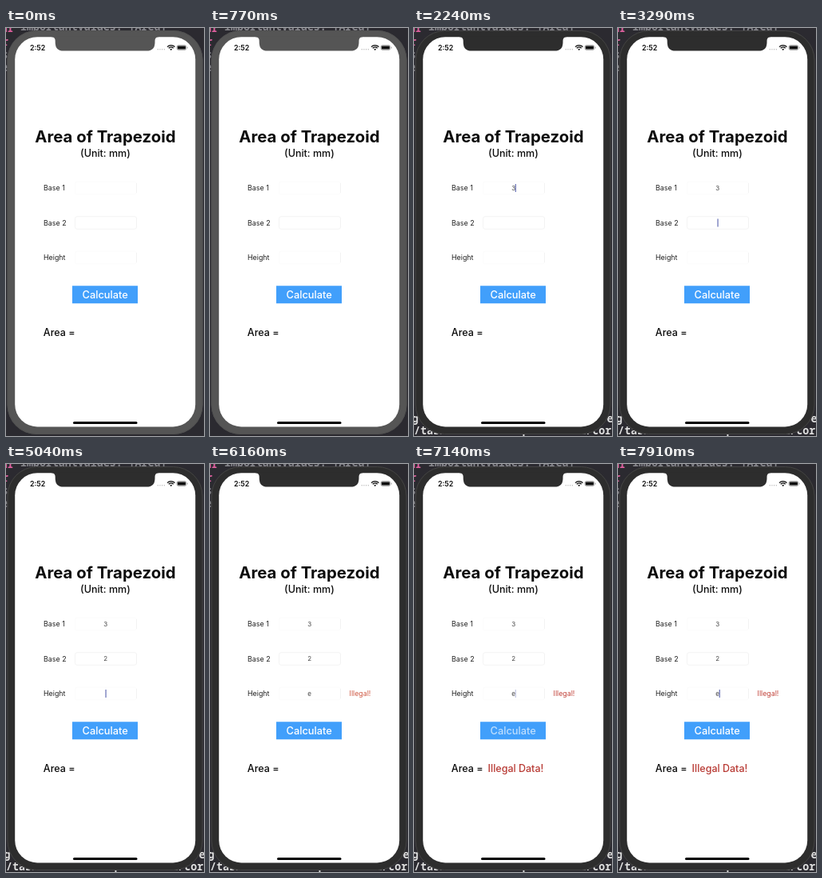
Recreate the animation shown at these times as an HTML page with a canvas. Size 248x510 px, loop 8000 ms.

```html
<!DOCTYPE html>
<html lang="en">
<head>
<meta charset="utf-8">
<title>Area of Trapezoid</title>
<style>
html, body { margin: 0; width: 100%; height: 100%; overflow: hidden; background: #2b2a30; }
canvas { display: block; width: 248px; height: 510px; }
</style>
</head>
<body>
<canvas id="stage"></canvas>
<script>
const W = 248, H = 510, LOOP = 8000, STEP = 70;
const SANS = 'Inter, "Liberation Sans", sans-serif';
const MONO = '"Noto Sans Mono", "DejaVu Sans Mono", monospace';
const INK = '#0c0c0c', CARET = '#5660ad';
const canvas = document.getElementById('stage');
const ctx = canvas.getContext('2d');
const dpr = window.devicePixelRatio || 1;
canvas.width = W * dpr;
canvas.height = H * dpr;

const clamp = v => Math.max(0, Math.min(1, v));
const ramp = (t, from, to) => clamp((t - from) / (to - from));

function text(str, x, y, size, { color = INK, weight = 400, align = 'left', family = SANS, alpha = 1 } = {}) {
  ctx.globalAlpha = alpha;
  ctx.font = `${weight} ${size}px ${family}`;
  ctx.textAlign = align;
  ctx.fillStyle = color;
  ctx.fillText(str, x, y);
  ctx.globalAlpha = 1;
}

function box(x, y, w, h, r, fill, stroke) {
  ctx.beginPath();
  ctx.roundRect(x, y, w, h, r);
  if (fill) { ctx.fillStyle = fill; ctx.fill(); }
  if (stroke) { ctx.strokeStyle = stroke; ctx.lineWidth = 1; ctx.stroke(); }
}

function drawDesktop(t) {
  ctx.fillStyle = '#2b2a30';
  ctx.fillRect(0, 0, W, H);
  const code = (str, x, y, color, alpha) => text(str, x, y, 13.3, { color, alpha, family: MONO, weight: 600 });
  code('ar', -6, 5, '#e0609f');
  code('importantValues: [Area]', 18, 3, '#85858b');
  code('r', -5, 22, '#e0609f');
  code('s', -5.5, 38, '#85858b');
  code('e', -5.5, 54, '#85858b');
  const shown = t < 1400 ? 0 : t < 1540 ? 0.5 : 1;
  if (!shown) return;
  code('g', -2.5, 492.5, '#dedede', shown);
  code('e', 241.5, 493, '#dedede', shown);
  code('/tasks/stacks/shapes/areas2/cor', 0, 508, '#dedede', shown);
}

function drawPhone(t) {
  const active = t >= 1260;
  const bezel = active ? '#2d2d2d' : '#555555';
  box(1.5, 3, 245, 505, 37, bezel);
  box(2, 3.5, 244, 504, 36.5, null, active ? '#444' : '#505050');
  box(11.2, 11.2, 226, 487.3, 28, '#fff');

  // Notch
  ctx.fillStyle = bezel;
  ctx.beginPath();
  ctx.moveTo(57, 10.5);
  ctx.lineTo(57, 11.2);
  ctx.quadraticCurveTo(61.7, 11.2, 61.7, 16);
  ctx.lineTo(61.7, 18);
  ctx.quadraticCurveTo(61.7, 28.6, 72, 28.6);
  ctx.lineTo(176, 28.6);
  ctx.quadraticCurveTo(186.5, 28.6, 186.5, 18);
  ctx.lineTo(186.5, 16);
  ctx.quadraticCurveTo(186.5, 11.2, 191, 11.2);
  ctx.lineTo(191, 10.5);
  ctx.fill();
  box(84, 491.9, 80.5, 3, 1.5, '#000');
}

function drawStatus() {
  text('2:52', 30, 27.5, 8.8, { weight: 600 });
  for (let i = 0; i < 4; i++) box(189.5 + i * 2.7, 26, 1.5, 1.5, 0.75, '#bbb');

  ctx.strokeStyle = INK;
  ctx.lineWidth = 1.4;
  for (const r of [6.4, 4]) {
    ctx.beginPath();
    ctx.arc(206.7, 28, r, -Math.PI * 0.76, -Math.PI * 0.24);
    ctx.stroke();
  }
  ctx.fillStyle = INK;
  ctx.beginPath();
  ctx.moveTo(206.7, 28);
  ctx.arc(206.7, 28, 2, -Math.PI * 0.76, -Math.PI * 0.24);
  ctx.fill();

  box(214.1, 21.7, 11.6, 5.6, 1.7, null, '#999');
  box(214.9, 22.5, 10, 4, 0.8, INK);
  box(226.6, 23.5, 1, 2, 0.5, '#999');
}

// Returns the caret's position and opacity.
function caretAt(t) {
  if (t < 1680) return null;
  if (t < 2240) return { y: 200, x: 124, a: 1 };
  if (t < 3150) return { y: 200, x: 126.7, a: 1 - ramp(t, 2730, 2870) };
  if (t < 3710) return { y: 243.5, x: 124.5, a: 1 };
  if (t < 5040) return { y: 243.5, x: 126.7, a: t < 4900 ? 1 - ramp(t, 4340, 4480) : ramp(t, 4830, 4970) };
  if (t < 5460) return { y: 287, x: 124.5, a: 1 };
  const off = ramp(t, 5950, 6160) - ramp(t, 6510, 6720) + ramp(t, 7020, 7220) - ramp(t, 7500, 7700);
  return { y: 287, x: 126.7, a: 1 - off };
}

function drawField(label, y, value, edge = '#fcfcfc') {
  text(label, 47, y + 3.3, 8.9, { color: '#222' });
  box(86.5, y - 7.8, 77, 15.6, 2.5, '#fff', edge);
  ctx.fillStyle = '#f2f2f2';
  ctx.fillRect(163, y - 6, 1, 12);
  if (value) text(value, 124.6, y + 2.9, 8, { color: '#444', align: 'center' });
}

function drawForm(t) {
  text('Area of Trapezoid', 124.4, 142.5, 20.35, { weight: 700, align: 'center' });
  text('(Unit: mm)', 124.4, 161, 12.5, { weight: 500, align: 'center' });

  drawField('Base 1', 200, t >= 2240 && '3');
  drawField('Base 2', 243.5, t >= 3710 && '2', '#f4f4f4');
  drawField('Height', 287, t >= 5460 && 'e');

  const caret = caretAt(t);
  if (caret && caret.a > 0) {
    ctx.globalAlpha = caret.a;
    ctx.fillStyle = CARET;
    ctx.fillRect(caret.x, caret.y - 5, 1.1, 10);
    ctx.globalAlpha = 1;
  }

  const done = t >= 7070;
  if (t >= 5460) text('Illegal!', 174.6, 290.3, 8.8, { color: done ? '#c2453c' : '#cf5a45' });

  let alpha = 1;
  if (t >= 7000) alpha = done ? 0.6 + 0.4 * ramp(t, 7070, 7560) : 0.3;
  box(83, 322.3, 82, 22, 0, '#419ffb');
  text('Calculate', 124.2, 338.3, 12.8, { weight: 500, color: '#fff', align: 'center', alpha });

  text('Area =', 46.8, 384.7, 12.5, { weight: 500 });
  if (done) text('Illegal Data!', 92.6, 384.7, 12.5, { weight: 500, color: '#b83a34' });
}

function draw(now) {
  const t = Math.floor((now % LOOP) / STEP) * STEP;
  ctx.setTransform(dpr, 0, 0, dpr, 0, 0);
  drawDesktop(t);
  drawPhone(t);
  drawStatus();
  drawForm(t);
}

const start = performance.now();
function tick() {
  draw(performance.now() - start);
  requestAnimationFrame(tick);
}
tick();
</script>
</body>
</html>
```
